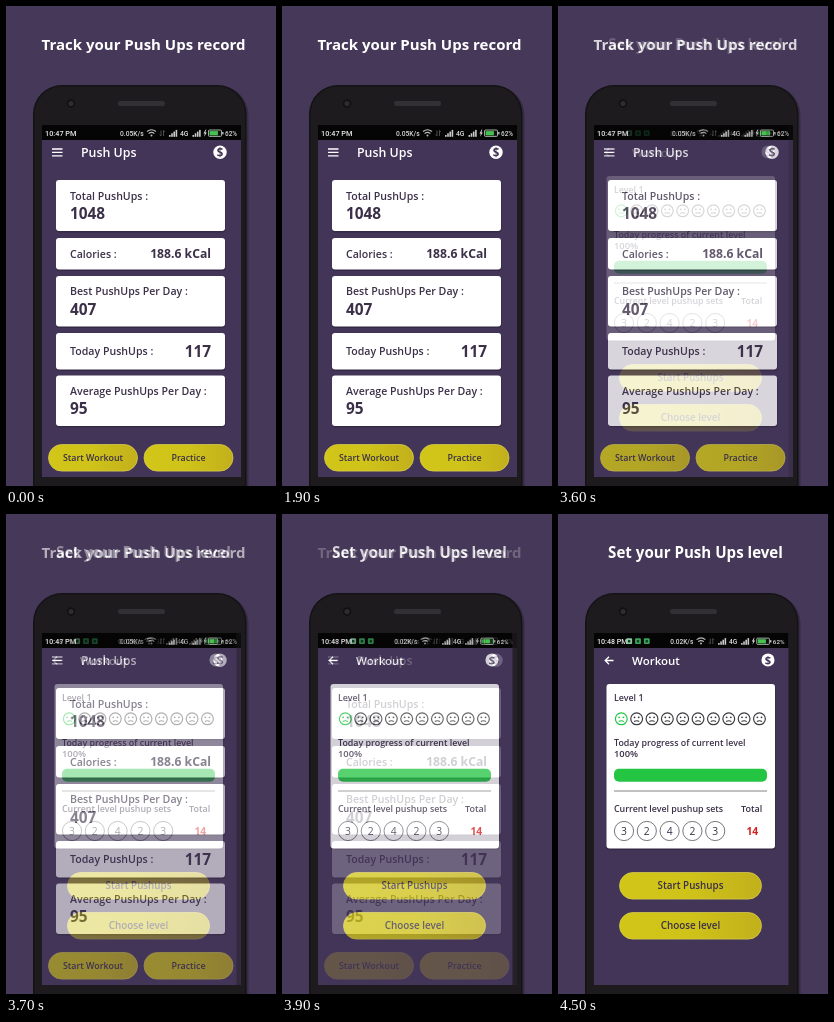
Write an HTML page that moves like this. It is 270 px wide and 480 px high and loops after 5.1 s.

```html
<!DOCTYPE html>
<html lang="en">
<head>
<meta charset="utf-8">
<title>Push Ups</title>
<style>
html, body { margin: 0; width: 100%; height: 100%; overflow: hidden; background: #463858; }
svg { display: block; width: 100vw; height: 100vh; }
text { font-family: "Open Sans", "Noto Sans", sans-serif; font-weight: 600; }
.status text { font-family: Roboto, "Noto Sans", sans-serif; font-weight: 500; }
</style>
</head>
<body>
<svg id="stage" viewBox="0 0 270 480"></svg>
<script>
const BG = '#463858', SCREEN = '#433558', INK = '#3b3048', BODY = '#1d1b1d', GREEN = '#25c544';
const LOOP = 5100;

// time in ms, opacity of the second screen
const FADE = [
  [0, 0], [3400, .03], [3500, .08], [3600, .2], [3700, .4],
  [3800, .6], [3900, .77], [4000, .93], [4100, .98], [4300, 1], [LOOP, 1]
];

const rect = (x, y, w, h, fill, r = 0, extra = '') =>
  `<rect x="${x}" y="${y}" width="${w}" height="${h}" rx="${r}" fill="${fill}" ${extra}/>`;
const circle = (x, y, r, fill, extra = '') =>
  `<circle cx="${x}" cy="${y}" r="${r}" fill="${fill}" ${extra}/>`;
const path = (d, color, width = 1) =>
  `<path d="${d}" fill="none" stroke="${color}" stroke-width="${width}"/>`;
const text = (x, y, size, str, fill = INK, weight = 600, anchor = 'start') =>
  `<text x="${x}" y="${y}" font-size="${size}" fill="${fill}" style="font-weight:${weight}" text-anchor="${anchor}">${str}</text>`;
const gradient = (id, ...stops) =>
  `<linearGradient id="${id}">${stops.map((c, i) =>
    `<stop offset="${i / (stops.length - 1)}" stop-color="${c}"/>`).join('')}</linearGradient>`;

const card = (x, y, w, h) =>
  rect(x, y + 1, w + .6, h + .6, '#000', 3, 'opacity=".22"') + rect(x, y, w, h, '#fff', 3);
const button = (x, y, w, size, label) =>
  rect(x + .5, y + .5, w - 1, 26.6, 'url(#gold)', 13.3, 'stroke="#d6ca4c" stroke-width=".8"') +
  text(x + w / 2, y + 17.2, size, label, INK, 600, 'middle');

function signal(x) {
  let bars = '';
  for (let i = 0; i < 4; i++) bars += rect(x + i * 2.2, 129 - i * 1.7, 1.6, 1.8 + i * 1.7, '#ccc');
  return bars;
}

function status(clock, speed, icons) {
  let s = text(39, 130, 7.3, clock, '#eee', 500) + text(114, 130, 6.7, speed, '#ddd', 500);
  if (icons) [72, 81, 90].forEach((x, i) => {
    s += rect(x - 3, 124, 6, 6, i ? '#38a45a' : '#8fc7a2', 1) + rect(x - 1.2, 126, 2.4, 2.4, '#163c24');
  });
  s += path('M141 125.5q4.5 -3.5 9 0M142.6 127.6q2.9 -2.3 5.8 0', '#bbb', 1.2) + circle(145.5, 129.5, 1, '#bbb');
  s += path('M155 124.5v5.5l-1.3 -1.5M157.5 130v-5.5l1.3 1.5', '#555', .9);
  s += signal(163) + text(174, 130, 6.8, '4G', '#ddd', 500) + signal(186.5);
  s += '<path d="M199.7 123.5l-2.2 4h1.4l-.8 3.2 2.7 -4.2h-1.5l1 -3z" fill="#ddd"/>';
  s += rect(202.5, 124, 13, 6.4, '#111', 1, 'stroke="#c9d6cc" stroke-width=".8"');
  s += rect(203.6, 125.1, 8.3, 4.2, '#45c24f') + rect(216.2, 126, 1.3, 2.4, '#c9d6cc');
  return `<g class="status">${s}${text(219, 130, 6.4, '62%', '#ddd', 500)}</g>`;
}

const coin = () => circle(214, 146.3, 6.7, '#fff') + text(214, 150.6, 11.5, '$', SCREEN, 700, 'middle');
const heading = (size, str) => text(137.5, 44.3, size, str, '#fff', 700, 'middle');

// The display is drawn 199 px wide; a narrower one shrinks its bar icons evenly.
function backdrop(width, bar) {
  const k = width / 199;
  return rect(0, 0, 270, 72, BG) + rect(36, 119, 199, 352, BODY) +
    rect(36, 119, width, 352, SCREEN) + rect(36, 119, width, 15, '#050506') +
    `<g transform="translate(36 130) scale(${k}) translate(-36 -130)">${bar}${coin()}</g>`;
}

function phone() {
  return rect(28, 80, 214.5, 440, '#2c2436', 29, 'opacity=".6"') +
    rect(27, 79, 213.5, 440, '#131214', 29) +
    rect(28.5, 80.5, 210.5, 440, BODY, 27.5) +
    circle(65, 97.5, 4.2, '#111113') + circle(65, 97.5, 2.6, '#2c2c31') +
    rect(112, 95, 47, 5, '#313034', 2.5);
}

function records() {
  const label = (y, str) => text(64, y, 10.6, str);
  const value = (y, str) => text(64, y, 15.4, str, INK, 700);
  let s = backdrop(199, status('10:47 PM', '0.05K/s', false)) + heading(15, 'Track your Push Ups record');
  s += path('M46 143h10.5M46 146.4h10.5M46 149.8h10.5', '#fff', 1.3);
  s += text(75, 150.8, 12.4, 'Push Ups', '#fff');
  for (const [y, h] of [[174, 51], [232, 31.5], [270, 50.5], [327, 36.5], [369.5, 50.5]]) s += card(50, y, 169, h);
  s += label(193.5, 'Total PushUps :') + value(213, '1048');
  s += label(251.7, 'Calories :') + text(205, 252.2, 12.2, '188.6 kCal', INK, 700, 'end');
  s += label(289, 'Best PushUps Per Day :') + value(308.5, '407');
  s += label(349.3, 'Today PushUps :') + text(205, 351, 15.4, '117', INK, 700, 'end');
  s += label(388.8, 'Average PushUps Per Day :') + value(408, '95');
  return s + button(42, 438, 90, 8.9, 'Start Workout') + button(137.5, 438, 90, 8.9, 'Practice');
}

function face(x, y, color) {
  return circle(x, y, 5.9, 'none', `stroke="${color}" stroke-width="1.2"`) +
    circle(x - 2.1, y - 1.5, .9, color) + circle(x + 2.1, y - 1.5, .9, color) +
    path(`M${x - 2.6} ${y + 2.6}q2.6 -1.4 5.2 0`, color, 1.1);
}

function workout() {
  const label = (x, y, str, size = 8.9) => text(x, y, size, str);
  let s = backdrop(194.5, status('10:48 PM', '0.02K/s', true)) + heading(15.1, 'Set your Push Ups level');
  s += path('M55.5 146.5h-8M51 142.8l-3.8 3.7 3.8 3.7', '#fff', 1.3);
  s += text(74, 150.8, 11.5, 'Workout', '#fff');
  s += card(48.5, 170, 168.5, 164.5) + label(56, 187.3, 'Level 1');
  for (let i = 0; i < 10; i++) s += face(63.3 + i * 15.35, 204.8, i ? '#3c3c40' : GREEN);
  s += label(56, 232, 'Today progress of current level') + label(56, 242.8, '100%', 9.4);
  s += rect(56, 254.8, 153, 13, GREEN, 5) + path('M56 277h153', '#77747c', .9);
  s += label(56, 298, 'Current level pushup sets') + label(183, 298, 'Total', 9);
  [3, 2, 4, 2, 3].forEach((n, i) => {
    const x = 66 + i * 22.8;
    s += circle(x, 317, 9.6, '#fff', 'stroke="#69666f" stroke-width=".9"') + text(x, 320.8, 10.3, n, INK, 400, 'middle');
  });
  s += text(194.3, 320.8, 10.3, '14', '#d3201f', 700, 'middle');
  return s + button(61, 358, 143, 9.8, 'Start Pushups') + button(61, 398, 143, 9.9, 'Choose level');
}

document.getElementById('stage').innerHTML =
  `<defs>${gradient('gold', '#d2c619', '#cfc219', '#c2b01c')}</defs>` +
  rect(0, 0, 270, 480, BG) + phone() + `<g>${records()}</g><g id="next" opacity="0">${workout()}</g>`;

document.getElementById('next').animate(
  FADE.map(([t, opacity]) => ({ offset: t / LOOP, opacity, easing: 'step-end' })),
  { duration: LOOP, iterations: Infinity }
);
</script>
</body>
</html>
```
